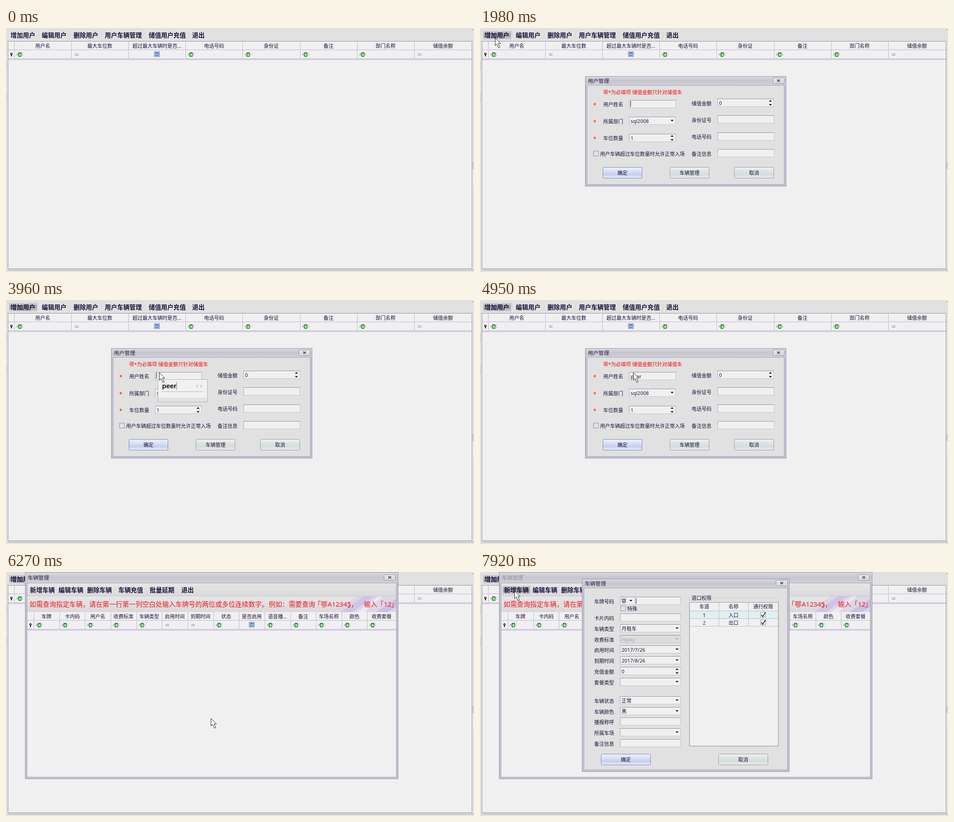
Write an HTML page that moves like this. It is 1033 by 542 pixels and loops after 8 s.

```html
<!DOCTYPE html>
<html lang="zh-CN">
<head>
<meta charset="utf-8">
<style>
html, body { margin: 0; width: 100%; height: 100%; overflow: hidden; background: #e1e1e1; }
svg { display: block; width: 1033px; height: 542px; }
text { font-family: "Noto Sans", "Noto Sans CJK SC", "Noto Sans CJK", sans-serif; white-space: pre; }
.ime { font-family: "Liberation Sans", Arial, sans-serif; }
</style>
</head>
<body>
<svg id="stage" viewBox="0 0 1033 542"></svg>
<script>
const INK = '#1c1238', RULE = '#bcb8da', RED = '#fa0606';

// Drawing helpers: each returns SVG markup
const box = (x, y, w, h, fill, extra = '') => `<rect x="${x}" y="${y}" width="${w}" height="${h}" fill="${fill}" ${extra}/>`;
const frame = (x, y, w, h, fill, stroke, extra = '') => box(x + .5, y + .5, w - 1, h - 1, fill, `stroke="${stroke}" ${extra}`);
const hline = (x, y, w, color) => box(x, y, w, 1, color);
const vline = (x, y, h, color) => box(x, y, 1, h, color);
const path = (d, fill, extra = '') => `<path d="${d}" fill="${fill}" ${extra}/>`;
// y is the vertical middle of the glyphs
const text = (x, y, s, { size = 11, color = INK, extra = '' } = {}) =>
  `<text x="${x}" y="${y + size * .37}" font-size="${size}" fill="${color}" ${extra}>${s}</text>`;
const mid = (x, y, s, o = {}) => text(x, y, s, { ...o, extra: 'text-anchor="middle"' });

const gradient = (id, stops) => `<linearGradient id="${id}" x2="0" y2="1">` +
  stops.map((c, i) => `<stop offset="${i / (stops.length - 1)}" stop-color="${c}"/>`).join('') + '</linearGradient>';

function toolbar(y, items, seps) {
  return items.map(([x, s]) => text(x, y, s, { size: 13.65, extra: 'font-weight="700"' })).join('') +
    seps.map(x => vline(x, y - 5, 11, '#c9c9cd') + vline(x + 1, y - 5, 11, '#f2f2f2')).join('');
}

const abcIcon = (x, y) =>
  text(x + 5, y, 'A', { size: 6.5, color: '#666' }) + box(x + 9, y - 5, 7, 10, '#2f9a35') +
  text(x + 10.5, y, 'B', { size: 7, color: '#fff', extra: 'font-weight="700"' }) +
  text(x + 16, y, 'C', { size: 6.5, color: '#666' });
const equalIcon = (x, y) => hline(x + 8, y - 2, 8, '#8c8c7c') + hline(x + 8, y + 1, 8, '#8c8c7c');
const boolIcon = (x, y) => frame(x - 6, y - 6, 12, 12, '#dbe6fa', '#6679a8') +
  box(x - 4, y - 4, 8, 8, '#4c7ed8') + box(x - 3, y - 1, 6, 3, '#9fc0f5');

// kinds: a = text filter, e = equals filter, b = tick filter
function grid(x, y, right, first, step, heads, kinds) {
  const w = right - x;
  let out = box(x, y, w, 39, '#f0f0f0') + hline(x, y + 18, w, RULE) +
    hline(x, y + 38, w, '#aaa6d0') + hline(x, y + 40, w, RULE);
  out += `<circle cx="${x + 7}" cy="${y + 27.5}" r="1.8" fill="#fff" stroke="#111" stroke-width="1.4"/>` + box(x + 6, y + 29, 2, 4, '#111');
  heads.forEach((s, i) => {
    const left = Math.round(first + i * step);
    const end = i === heads.length - 1 ? right : first + (i + 1) * step;
    const center = (left + end) / 2, row = y + 29;
    out += vline(left, y, 38, RULE) + mid(center, y + 10, s) +
      { a: abcIcon(left, row), e: equalIcon(left, row), b: boolIcon(center, row - 1) }[kinds[i]];
  });
  return out;
}

function panel(x, y, w, h, title, titleY, barH, closeX) {
  const cy = titleY - .5;
  return frame(x, y, w, h, '#c3c3d3', '#9696aa') + box(x + 1, y + 1, w - 2, barH - 1, 'url(#bar)') +
    frame(x + 4, y + barH, w - 8, h - barH - 4, '#e1e1e1', '#a6a6b4') +
    text(x + 6, titleY, title, { size: 11.8, color: '#2c2840' }) +
    frame(closeX, cy - 7, 26, 13, 'url(#button)', '#8e8e9c', 'rx="2"') +
    path(`M${closeX + 10} ${cy - 3}l6 5m0-5l-6 5`, 'none', 'stroke="#55555f" stroke-width="1.8"');
}

const field = (x, y, w, s = '', fill = '#f0f0f0', color = INK) =>
  frame(x, y, w, 18, fill, '#c4c4cc') + hline(x, y, w, '#8f9498') + vline(x, y, 18, '#a9adb2') + text(x + 3.5, y + 9.5, s, { color });
const arrow = (x, y, color = '#181028', dir = 1) => path(`M${x - 3.5} ${y}h7l-3.5 ${3.5 * dir}z`, color);
const combo = (x, y, w, s, off) =>
  field(x, y, w, s, off ? '#dcdcdc' : '#f0f0f0', off ? '#a4a4a8' : INK) + arrow(x + w - 8, y + 7, off ? '#a8a8a8' : undefined);
const spin = (x, y, w, s) => field(x, y, w, s) + arrow(x + w - 8, y + 6.5, '#181028', -1) + arrow(x + w - 8, y + 12);
const checkbox = (x, y) => frame(x, y, 12, 12, '#f4f4f4', '#8a8a96') + frame(x + 2, y + 2, 8, 8, '#e4e4e8', '#cfcfd8');
const button = (x, y, w, s, look = 'button') =>
  frame(x, y, w, 25, `url(#${look})`, look === 'button' ? '#9a9ca6' : '#8088ae', 'rx="2"') + mid(x + w / 2, y + 13, s);
const hot = (x, y, w) => frame(x, y, w, 18, 'url(#hot)', '#c4c4ca');
const caret = (x, y) => vline(x, y, 13, '#111');

const defs = '<defs>' +
  gradient('bar', ['#d8d8df', '#c6c6ce', '#d0d0da']) +
  gradient('button', ['#f2f2f2', '#e2e2e4', '#d3dfdb', '#e9e9ec']) +
  gradient('default', ['#eceffa', '#dde2f4', '#c6cdf0', '#e6f0fa']) +
  gradient('hover', ['#e2e2fa', '#cfcff2', '#d6d6f6', '#ececfc']) +
  gradient('hot', ['#d2d2d6', '#a8a8b0', '#a6a6ae', '#d6d6da']) +
  gradient('strip', ['#e6e6e6', '#d9d9dc']) +
  '<clipPath id="banner"><rect x="47" y="54" width="814" height="35"/></clipPath></defs>';

const mainBack = box(0, 0, 1033, 542, '#e1e1e1') +
  frame(4, 29, 1025, 506, '#f0f0f0', '#8f989e') +
  '<path d="M6 537.5H1033M1029 3.5h4" stroke="#555" stroke-dasharray="1 1"/>' +
  hline(0, 92, 2, '#b4b4b4') + vline(1, 75, 18, '#c6c6c6') + hline(0, 163, 2, '#b4b4b4') + vline(1, 146, 18, '#c6c6c6') +
  box(1029, 297, 4, 16, '#cfcfcf') + box(1030, 313, 3, 36, '#e9e9e9');

const mainFront = toolbar(16, [[10, '增加用户'], [79, '编辑用户'], [149, '删除用户'], [218, '用户车辆管理'], [315, '储值用户充值'], [411, '退出']],
    [72, 142, 211, 308, 405]) +
  grid(5, 30, 1028, 18, 126.1, ['用户名', '最大车位数', '超过最大车辆时是否...', '电话号码', '身份证', '备注', '部门名称', '储值余额'], 'aebaaaae');

const accountPanel = panel(232, 107, 444, 245, '用户管理', 118, 20, 646) +
  text(272, 143, '带*为必填项 储值金额只针对储值车', { color: RED }) +
  ['用户姓名', '所属部门', '车位数量'].map((s, i) =>
    text(250, 172 + i * 37.5, '*', { color: RED, size: 12 }) + text(272, 170 + i * 37.5, s)).join('') +
  ['储值金额', '身份证号', '电话号码', '备注信息'].map((s, i) => text(467, 167.5 + i * 37.4, s)).join('') +
  field(329, 160, 103) + combo(329, 197, 103, 'sql2008') + spin(329, 235, 103, '1') +
  spin(524, 157, 125, '0') + field(524, 194, 125) + field(524, 232, 126) + field(524, 269, 126) +
  checkbox(250, 273) + text(265, 279.5, '用户车辆超过车位数量时允许正常入场') +
  button(271, 309, 87, '确定') + button(419, 309, 87, '车辆管理') + button(561, 309, 88, '取消');

const ime = (w, typed, caretX, words) => frame(335, 176, w, 51, '#f1f1f1', '#b2b2b6') +
  box(336, 217, w - 2, 9, '#e2e2e4') + hline(344, 203, w - 20, '#b9b9b9') +
  text(344.5, 190.5, typed, { size: 15, color: '#111', extra: 'class="ime" font-weight="700"' }) +
  vline(caretX, 182, 17, '#2c9a3c') +
  path(`M${w + 313} 188v7l-4-3.5zM${w + 319} 188v7l4-3.5z`, '#c8c8cc') +
  text(345, 211, words, { size: 12 });

const banner = '<g clip-path="url(#banner)">' + box(47, 54, 814, 35, 'url(#strip)') +
  path('M715 89L775 54H861V89z', '#dcd6e6') + path('M738 89L790 54H812L764 89z', '#cfc4e6') +
  path('M775 89L822 54H832L792 89z', '#ece8f4') + path('M815 89L861 60V78L843 89z', '#cabfe4') +
  [[52, '如需查询指定车辆，请在第一行第一列空白处输入车牌号的两位或多位连续数字。'], [580, '例如：需要查询'], [680, '「鄂'], [710, 'A12345'],
   [754, '」，'], [790, '输入'], [819, '「'], [834, '12'], [850, '」']]
    .map(([x, s]) => text(x, 72, s, { size: 14.65, color: '#fa1414' })).join('') + '</g>';

const carBack = panel(42, 0, 824, 460, '车辆管理', 13, 24, 834) + box(47, 25, 814, 29, 'url(#strip)') +
  box(47, 89, 814, 366, '#f0f0f0') + hline(47, 53, 814, '#c8c8d0') + banner;
const carFront = toolbar(40, [[53, '新增车辆'], [116, '编辑车辆'], [179, '删除车辆'], [248, '车辆充值'], [317, '批量延期'], [387, '退出']], [241, 310, 380]) +
  grid(47, 89, 861, 61, 56.65, ['车牌', '卡内码', '用户名', '收费标准', '车辆类型', '启用时间', '到期时间', '状态', '是否启用', '语音播...', '备注', '车场名称', '颜色', '收费套餐'], 'aaaaaeeabaaaaa');

const rows = [[55, '车牌号码'], [92, '卡片内码'], [116, '车辆类型', combo, '月租车'], [140, '收费标准', combo, 'repay', true],
  [163, '启用时间', combo, '2017/7/26'], [187, '到期时间', combo, '2017/8/26'], [211, '充值金额', spin, '0'], [235, '套餐类型', combo, ''],
  [276, '车辆状态', combo, '正常'], [300, '车辆颜色', combo, '黑'], [323, '播报称呼'], [347, '所属车场', combo, ''], [371, '备注信息']];

const tick = y => frame(619, y - 6, 12, 12, '#f4f4f4', '#9a9aa4') +
  path(`M621 ${y}l3 4l6-9`, 'none', 'stroke="#333" stroke-width="1.9"');

const carPanel = panel(225, 15, 458, 429, '车辆管理', 25.5, 20, 653) +
  rows.map(([y, label, kind = field, s, off]) => text(252, y + 10.5, label) + kind(309, y, 134, s, off)).join('') +
  text(312, 64.5, '鄂') + arrow(333, 62) + vline(341, 56, 16, '#c0c0c8') + caret(344, 58) +
  checkbox(310, 75) + text(325, 82, '特殊') +
  frame(461, 57, 199, 331, 'none', '#d2d2d4') + box(465, 52, 48, 12, '#e1e1e1') + text(467, 58, '道口权限') +
  frame(462, 67, 197, 320, '#f0f0f0', '#8f989e') + box(463, 87, 195, 16, '#dff0f0') +
  [86, 103, 120].map(y => hline(463, y, 195, RULE)).join('') +
  [527, 592].map(x => vline(x, 68, 53, RULE)).join('') +
  mid(495, 77, '车道') + mid(559.5, 77, '名称') + mid(625, 77, '通行权限') +
  mid(495, 96, '1') + mid(559.5, 96, '入口') + tick(95) +
  mid(495, 113, '2', { color: '#8a1020' }) + mid(559.5, 113, '出口') + tick(112) +
  button(267, 404, 110, '确定', 'default') + button(526, 404, 110, '取消');

// [from, to, markup] in ms, back to front
const END = 8000;
const layers = [
  [0, END, mainBack],
  [1980, END, hot(7, 7, 62)],
  [0, END, mainFront],
  [1980, 6270, accountPanel],
  [1980, 5610, button(271, 309, 87, '确定', 'default')],
  [5610, 6270, button(419, 309, 87, '车辆管理', 'hover')],
  [5940, 6270, frame(422, 311, 82, 20, 'none', '#222', 'stroke-dasharray="1 1"')],
  [4290, 6270, text(332.5, 169.5, 'peer')],
  ...[[1980, 2640], [2970, 3300], [3960, 4290]].map(([a, b]) => [a, b, caret(332, 162)]),
  ...[[4290, 4950], [5280, 5940]].map(([a, b]) => [a, b, caret(353, 162)]),
  [3300, 3960, ime(285, 'pe', 363, '1.配   2.陪   3.培   4.佩   5.赔')],
  [3960, 4290, ime(110, 'peer', 376, '')],
  [6270, END, carBack],
  [7590, END, hot(50, 31, 61)],
  [6270, END, carFront],
  [7920, END, box(47, 5, 52, 16, '#cbcbd3') + text(48, 13, '车辆管理', { size: 11.8, color: '#9292a0' }) + carPanel]
];

// [time, x, y] of the pointer
const stops = [[990, 378, 231], [1320, 82, 57], [1650, 33, 22], [2310, 71, 44], [2640, 338, 161], [5280, 394, 300],
  [5610, 460, 330], [5940, 452, 325], [6600, 310, 260], [6930, 88, 122], [7260, 77, 56], [7590, 76, 42]];

const stage = document.getElementById('stage');
stage.innerHTML = defs + layers.map(l => `<g>${l[2]}</g>`).join('') +
  '<g>' + path('M.5 .5V17L4.3 13.6L8 22L11 20.6L7.4 12.4H12.6z', '#fff', 'stroke="#222"') + '</g>';
const groups = [...stage.querySelectorAll(':scope > g')];
const pointer = groups.pop();

function draw() {
  const t = performance.now() % END;
  layers.forEach(([from, to], i) => groups[i].style.display = t >= from && t < to ? '' : 'none');
  const at = stops.filter(s => s[0] <= t).pop();
  pointer.style.display = at ? '' : 'none';
  if (at) pointer.setAttribute('transform', `translate(${at[1]} ${at[2]})`);
  requestAnimationFrame(draw);
}
draw();
</script>
</body>
</html>
```
